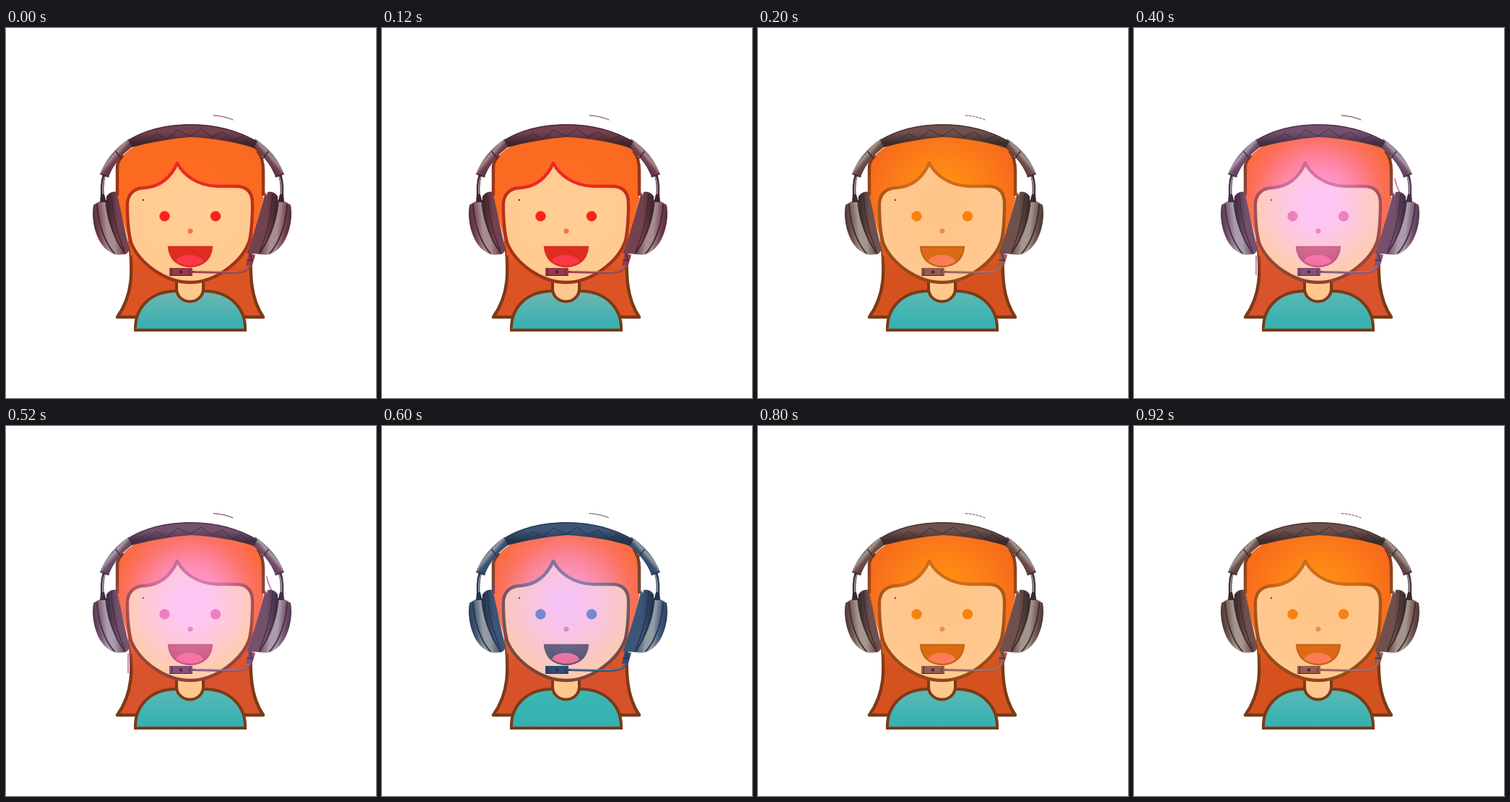
Write an HTML page that moves like this. It is 512x512 px and loops after 1 s.

```html
<!DOCTYPE html>
<html lang="en">
<head>
<meta charset="utf-8">
<title>Headset girl under changing light</title>
<style>
html, body { margin: 0; width: 100%; height: 100%; overflow: hidden; background: #fff; }
svg { display: block; width: 100%; height: 100%; animation: light 1s step-end infinite; }

/* One palette per coloured light, switched without blending */
@keyframes light {
  0% {
    --skin: #ffcd95; --skin2: #ffca90; --hair: #ff6c22; --hair2: #f9691f; --low: #dc5423;
    --line: #ea2a24; --eye: #fb2318; --nose: #fb6b4c; --mouth: #dd2c20; --lip: #d8301f; --tongue: #fb3748;
    --dark: #40252e; --mid: #74414f; --pale: #a58d90; --mic: #98394b; --shirt: #6ab5b1;
    --glow: 0; --fringe: 0; --stray: #7a2334; --gap: 5 1;
  }
  20%, 80% {
    --skin: #ffc487; --skin2: #ffc992; --hair: #ff8b14; --hair2: #f7691d; --low: #d5521f;
    --line: #cd6c1b; --eye: #f6830d; --nose: #e98f50; --mouth: #dc6c14; --lip: #bf6518; --tongue: #fd7b54;
    --dark: #3b2c2c; --mid: #6f504c; --pale: #a5958f; --mic: #985c52; --shirt: #58b9b4;
    --glow: 0; --fringe: 0; --stray: #6b4541; --gap: 3 2;
  }
  40% {
    --skin: #fdc6f6; --skin2: #ffcda2; --hair: #ff7fb2; --hair2: #fb6a3a; --low: #d9532c;
    --line: #c2598a; --eye: #e662a8; --nose: #ea66b4; --mouth: #c9557c; --lip: #bb5474; --tongue: #f5699f;
    --dark: #432f45; --mid: #74506c; --pale: #a99cab; --mic: #86507a; --shirt: #56b8b4;
    --glow: .4; --fringe: .7; --stray: #6c294e; --gap: none;
  }
  60% {
    --skin: #f6c2f3; --skin2: #fdcaaa; --hair: #fb84ac; --hair2: #fb6b3c; --low: #d7522a;
    --line: #6a6590; --eye: #4675c4; --nose: #dc6cc8; --mouth: #4b5070; --lip: #565064; --tongue: #e76c9c;
    --dark: #24334c; --mid: #3c5576; --pale: #959ba3; --mic: #2e4c74; --shirt: #3db6b4;
    --glow: .35; --fringe: 0; --stray: #39435b; --gap: 3 1;
  }
}

.line { stroke: url(#gLine); stroke-width: 4.4; stroke-linejoin: round; }
.thin { fill: none; stroke-linecap: round; }
.eye { fill: var(--eye); }
.dark { fill: var(--dark); }
.mid { fill: var(--mid); }
.mic { fill: var(--mic); }
.sDark { stroke: var(--dark); }
.sMid { stroke: var(--mid); }
.sPale { stroke: var(--pale); }
.sMic { stroke: var(--mic); }
.fringe { stroke: #a33a88; stroke-dasharray: 1 2; opacity: var(--fringe); }
.stray { stroke: var(--stray); stroke-dasharray: var(--gap); }
.glow { opacity: var(--glow); }
</style>
</head>
<body>
<svg viewBox="0 0 512 512" role="img" aria-label="Smiling girl with a headset">
  <defs>
    <radialGradient id="gSkin" gradientUnits="userSpaceOnUse" cx="255" cy="248" r="105">
      <stop offset=".15" style="stop-color:var(--skin)"/>
      <stop offset="1" style="stop-color:var(--skin2)"/>
    </radialGradient>
    <radialGradient id="gGlow">
      <stop offset=".2" style="stop-color:var(--skin)"/>
      <stop offset="1" style="stop-color:var(--skin);stop-opacity:0"/>
    </radialGradient>
    <radialGradient id="gHair" gradientUnits="userSpaceOnUse" cx="255" cy="235" r="110">
      <stop offset=".3" style="stop-color:var(--hair)"/>
      <stop offset="1" style="stop-color:var(--hair2)"/>
    </radialGradient>
    <linearGradient id="gLow" gradientUnits="userSpaceOnUse" x1="0" y1="240" x2="0" y2="400">
      <stop offset="0" style="stop-color:var(--hair2)"/>
      <stop offset=".6" style="stop-color:var(--low)"/>
    </linearGradient>
    <radialGradient id="gLine" gradientUnits="userSpaceOnUse" cx="255" cy="245" r="125">
      <stop offset=".45" style="stop-color:var(--line)"/>
      <stop offset="1" stop-color="#7c3a17"/>
    </radialGradient>
    <linearGradient id="gShirt" x1="0" y1="0" x2="0" y2="1">
      <stop offset=".1" style="stop-color:var(--shirt)"/>
      <stop offset="1" stop-color="#31b0b0"/>
    </linearGradient>
    <linearGradient id="gShell" x1="0" y1=".58" x2="1" y2=".42">
      <stop offset="0" style="stop-color:var(--dark)"/>
      <stop offset=".2" style="stop-color:var(--mid)"/>
      <stop offset=".42" style="stop-color:var(--pale)"/>
      <stop offset=".6" style="stop-color:var(--pale)"/>
      <stop offset=".85" style="stop-color:var(--mid)"/>
      <stop offset="1" style="stop-color:var(--dark)"/>
    </linearGradient>
    <linearGradient id="gPad" x1="0" y1=".55" x2="1" y2=".45">
      <stop offset=".1" style="stop-color:var(--dark)"/>
      <stop offset=".5" style="stop-color:var(--mid)"/>
      <stop offset="1" style="stop-color:var(--mid)"/>
    </linearGradient>
    <linearGradient id="gArm" x1=".2" y1=".2" x2=".7" y2=".7">
      <stop offset=".2" style="stop-color:var(--dark)"/>
      <stop offset=".45" style="stop-color:var(--pale)"/>
      <stop offset=".6" style="stop-color:var(--mid)"/>
      <stop offset="1" style="stop-color:var(--dark)"/>
    </linearGradient>
    <linearGradient id="gBand" x1="0" y1="0" x2="0" y2="1">
      <stop offset="0" style="stop-color:var(--mid)"/>
      <stop offset=".35" style="stop-color:var(--mid)"/>
      <stop offset=".8" style="stop-color:var(--dark)"/>
    </linearGradient>
    <clipPath id="mouthClip"><path d="M225 303H285C283 322 270 330 255 330S227 322 225 303Z"/></clipPath>

    <g id="side">
      <path class="thin sDark" stroke-width="4.5" d="M136 203C132 216 133 226 134 242"/>
      <path class="thin sPale" stroke-width="1.6" d="M136.500 206C132.500 217 133.500 226 134.500 240"/>
      <path fill="url(#gPad)" d="M139 233Q145 225 153 227C160 255 165 283 171 306Q168 315 160 313C148 300 138 262 139 233Z"/>
      <path class="thin sDark" stroke-width="1.2" d="M146 230C147 258 154 285 164 309"/>
      <path fill="url(#gShell)" d="M121 245Q128 240 137 237C139 265 150 294 166 312Q152 317 141 308C126 298 117 268 121 245Z"/>
      <path class="thin sDark" stroke-width="1.8" d="M126 245C127 269 136 296 150 312M138 239C140 266 151 294 164 311"/>
      <path class="dark" d="M130 241L131 230H136L139 241Z"/>
      <path fill="url(#gArm)" d="M130 202C138 181 152 166 170 153L177 163C161 174 149 188 142 206Z"/>
      <path class="thin sDark" stroke-width="1.5" d="M131 202L142 206M152 171L160 181"/>
    </g>
  </defs>

  <rect width="512" height="512" fill="#fff"/>
  <path class="thin stray" stroke-width="1" d="M287 121Q302 122 314 127"/>

  <!-- Hair -->
  <path class="line" fill="url(#gLow)" d="M170 285C176 338 176 369 154 400H356C339 375 337 348 339 285Z"/>
  <path fill="url(#gHair)" d="M154 236V190Q165 164 200 155L257 147L330 155Q356 168 356 198V236L340 300H171Z"/>
  <path class="line" fill="none" d="M154 232V190Q156 182 162 176M348 170Q356 180 356 198V232"/>
  <path fill="url(#gLow)" d="M168 285L173 315H337L342 285Z"/>
  <path class="thin fringe" stroke-width="2" d="M361 209Q363 218 367 226M169 316V342M340 318V334"/>

  <!-- Body and neck -->
  <path fill="url(#gShirt)" stroke="#7b3a18" stroke-width="4" d="M179 418C178 388 199 364 236 364H274C310 364 332 388 331 418Z"/>
  <path fill="#fec78e" stroke="#7b3a18" stroke-width="4" d="M236 346V361A18.5 17.5 0 0 0 273 361V346"/>

  <!-- Face -->
  <path class="line" fill="url(#gSkin)" d="M237 187C228 207 213 219 193 221C175 221 167 232 168 248C168 268 170 285 173 297C185 326 220 352 255 352C291 352 328 322 337 294C340 280 341 262 341 243C341 227 333 219 318 219H292C265 218 246 204 237 187Z"/>
  <circle class="eye" cx="219.5" cy="260.5" r="7.2"/>
  <circle class="eye" cx="290" cy="260.5" r="7.2"/>
  <circle style="fill:var(--nose)" cx="255" cy="281" r="3.5"/>
  <circle class="mid" cx="190" cy="238" r="1.3"/>
  <g clip-path="url(#mouthClip)">
    <rect style="fill:var(--mouth)" x="224" y="302" width="62" height="30"/>
    <ellipse style="fill:var(--tongue)" cx="254" cy="324" rx="19" ry="10"/>
  </g>
  <path fill="none" style="stroke:var(--lip)" stroke-width="2.5" stroke-linejoin="round" d="M225 303H285C283 322 270 330 255 330S227 322 225 303Z"/>
  <circle class="glow" fill="url(#gGlow)" cx="255" cy="248" r="92"/>

  <!-- Headset -->
  <path class="mid" d="M359 227C351 255 344 285 333 312L355 313L366 245Z"/>
  <use href="#side"/>
  <use href="#side" transform="matrix(-1 0 0 1 515 0)"/>
  <path fill="url(#gBand)" d="M169 155C196 138 228 133 257 133C290 133 321 141 348 157L343 166C316 157 288 153 257 151C228 153 202 158 174 165Z"/>
  <path class="thin sDark" stroke-width="1" d="M170 155C196 139 228 134 257 134C290 134 321 142 347 157"/>
  <path class="thin sDark" stroke-width="1" d="M177 157L191 160L208 146L222 154L238 141L254 150L270 140L285 151L300 144L314 156L326 150L338 161"/>

  <!-- Microphone -->
  <path class="thin sMic" stroke-width="3" d="M338 324C337 338 326 339 304 338.5L258 337.5"/>
  <path class="thin sPale" stroke-width=".8" d="M337 327C335 337 325 338 304 337.5L262 337"/>
  <path class="mic" d="M336 312L345 314L341 328L332 329Z"/>
  <path class="thin sDark" stroke-width="1.3" d="M337 313L341 322L334 321"/>
  <rect class="mic" x="226" y="332" width="32" height="11"/>
  <path class="thin sDark" stroke-width="1" d="M229.500 333V342M227 342.500H257M254 334V341"/>
  <circle class="dark" cx="242" cy="337.500" r="2.200"/>
</svg>
</body>
</html>
```
